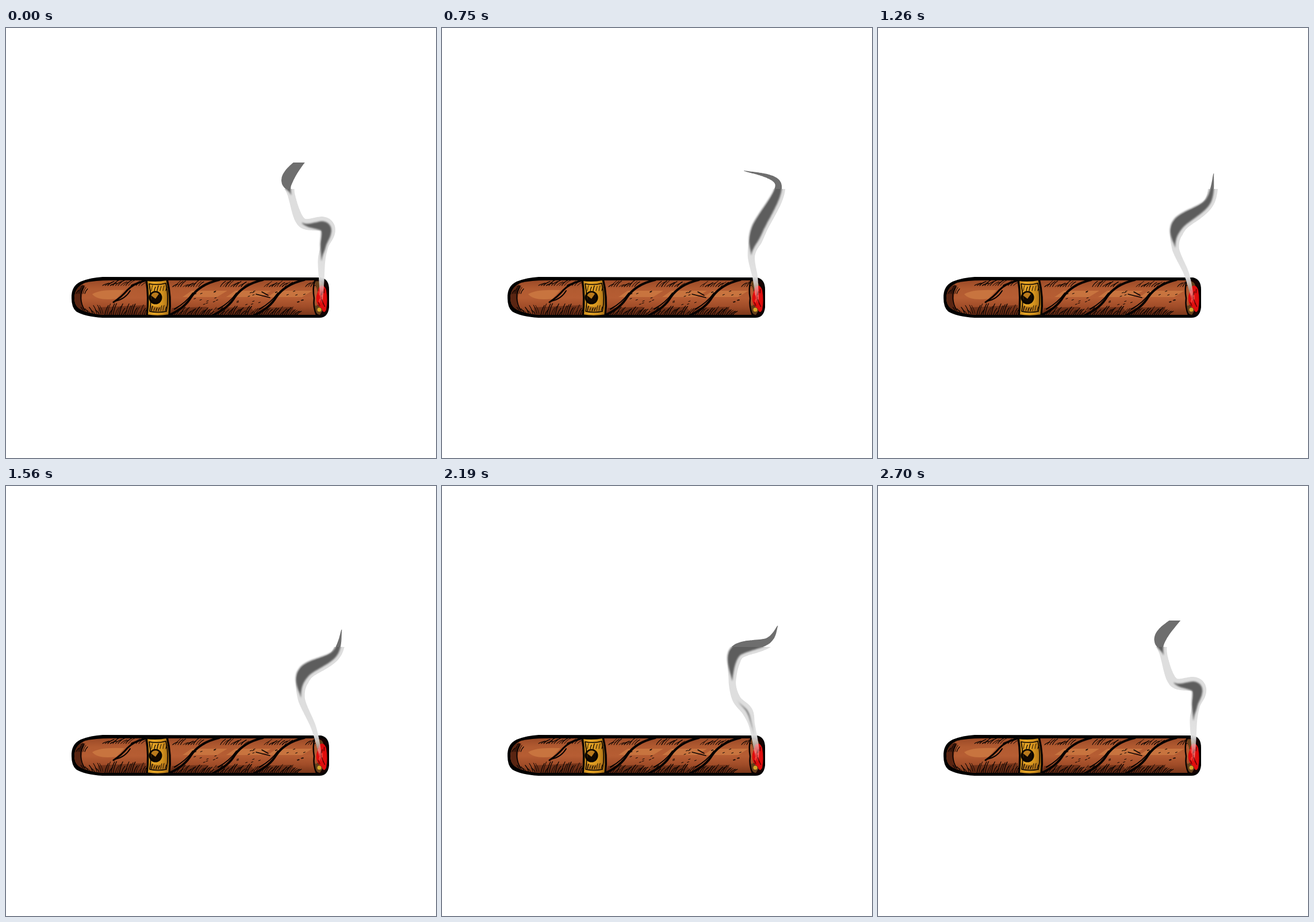
An HTML page with a canvas for the animation above (2.73 s loop, 748 by 748 pixels).

```html
<!DOCTYPE html>
<html lang="en">
<head>
<meta charset="utf-8">
<title>Cigar</title>
<style>
html, body { margin: 0; width: 100%; height: 100%; overflow: hidden; background: #fff; }
canvas { display: block; width: 748px; height: 748px; }
</style>
</head>
<body>
<canvas id="stage" width="748" height="748"></canvas>
<script>
const SIZE = 748, LOOP = 2730;
const PALE_TOP = 280, DARK_TOP = 234;
const BIRTH = -840, SHAPED = -330, DEATH = LOOP + 470;
const BASE = { x: 549, y: 479, dark: 0, pale: 4 };

const ctx = document.getElementById('stage').getContext('2d');
const art = document.createElement('canvas');
art.width = art.height = SIZE;
const pen = art.getContext('2d');

let seed = 11;
const random = () => (seed = seed * 16807 % 2147483647) / 2147483647;
const mix = (a, b, k) => a + (b - a) * k;
const ramp = (a, b, v) => Math.min(1, Math.max(0, (v - a) / (b - a)));

// A puff is a bent strand of four points, tail to tip, at a few ages.
const puffPoses = [
  { age: SHAPED, at: [[547, 434], [543, 408], [536, 390], [511, 373]] },
  { age: 390, at: [[551, 368], [562, 343], [577, 296], [519, 298]] },
  { age: 750, at: [[538, 394], [548, 351], [585, 272], [525, 248]] },
  { age: 1260, at: [[517, 381], [522, 341], [573, 303], [584, 253]] },
  { age: 2400, at: [[502, 328], [508, 276], [565, 262], [584, 241]] },
  { age: LOOP, at: [[496, 290], [490, 262], [520, 225], [560, 190]] },
  { age: DEATH, at: [[486, 205], [478, 180], [508, 140], [545, 105]] }
];

function puffShape(age) {
  const next = Math.max(1, puffPoses.findIndex(p => p.age > age));
  const a = puffPoses[next - 1], b = puffPoses[next];
  const k = ramp(a.age, b.age, age), mature = ramp(390, 750, age);
  const dark = [1, 10 + 11 * mature, 18 - 7 * mature, 1];
  const rim = [12, 4, 7, 16];
  return a.at.map(([x, y], i) => ({
    x: mix(x, b.at[i][0], k), y: mix(y, b.at[i][1], k),
    dark: dark[i], pale: dark[i] + rim[i]
  }));
}

// A young puff bulges out of the straight stem below the older one.
function growFromStem(puff, top, age) {
  const k = ramp(BIRTH, SHAPED, age);
  puff.forEach((p, i) => {
    const along = (i + 1) / 5;
    p.x = mix(mix(BASE.x, top.x, along), p.x, k);
    p.y = mix(mix(BASE.y, top.y, along), p.y, k);
    p.dark *= k ** 4;
    p.pale = mix(mix(BASE.pale, top.pale, along), p.pale, k);
  });
}

function spline(a, b, c, d, u) {
  return (2 * b + (c - a) * u + (2 * a - 5 * b + 4 * c - d) * u * u
    + (3 * b - a - 3 * c + d) * u * u * u) / 2;
}

function samplePath(points) {
  const samples = [], last = points.length - 1, steps = 40;
  for (let i = 0; i < last * steps; i++) {
    const n = Math.floor(i / steps), u = i % steps / steps;
    const near = [n - 1, n, n + 1, n + 2].map(j => points[Math.min(last, Math.max(0, j))]);
    const at = key => spline(...near.map(p => p[key]), u);
    samples.push({ x: at('x'), y: at('y'), dark: at('dark'), pale: at('pale'), n });
  }
  return samples;
}

function brush(samples, key) {
  const path = new Path2D();
  for (const s of samples) {
    const r = Math.max(0, s[key] / 2);
    path.moveTo(s.x + r, s.y);
    path.arc(s.x, s.y, r, 0, 7);
  }
  return path;
}

// The pale layer lies a little to the right of the dark strand.
function shiftRight(samples) {
  return samples.map((s, i) => {
    const a = samples[Math.max(0, i - 1)], b = samples[Math.min(samples.length - 1, i + 1)];
    const dx = b.x - a.x, dy = b.y - a.y, length = Math.hypot(dx, dy) || 1;
    const shift = Math.min(4, Math.max(0, s.dark) * 0.25);
    return { ...s, x: s.x - dy / length * shift, y: s.y + dx / length * shift };
  });
}

function fillBetween(path, top, bottom, style, blur = 0) {
  ctx.save();
  ctx.beginPath();
  ctx.rect(0, top, SIZE, bottom - top);
  ctx.clip();
  if (blur) ctx.filter = `blur(${blur}px)`;
  ctx.fillStyle = style;
  ctx.fill(path);
  ctx.restore();
}

const fade = ctx.createLinearGradient(0, 400, 0, 480);
fade.addColorStop(0, '#dedede');
fade.addColorStop(0.45, 'rgba(226,226,226,.95)');
fade.addColorStop(1, 'rgba(235,225,225,0)');

function drawSmoke(t) {
  const ages = [t - LOOP, t, t + LOOP].filter(age => age > BIRTH && age < DEATH);
  const puffs = ages.map(puffShape);
  if (ages[0] < SHAPED) growFromStem(puffs[0], puffs[1][0], ages[0]);

  const foot = puffs[0][0];
  const bend = { x: mix(BASE.x, foot.x, 0.36), y: mix(BASE.y, foot.y, 0.5), dark: 0, pale: 9 };
  const samples = samplePath([BASE, bend, ...puffs.flat()]);
  fillBetween(brush(shiftRight(samples), 'pale'), PALE_TOP, SIZE, fade);

  puffs.forEach((puff, i) => {
    const first = 2 + 4 * i;
    const strand = brush(samples.filter(s => s.n >= first && s.n < first + 3), 'dark');
    fillBetween(strand, DARK_TOP, PALE_TOP, 'rgba(0,0,0,.57)');
    fillBetween(strand, PALE_TOP, SIZE, 'rgba(0,0,0,.58)', 1.8);
  });
}

function fill(d, color) {
  pen.fillStyle = color;
  pen.fill(new Path2D(d));
}

function line(d, width, color = '#080302') {
  pen.strokeStyle = color;
  pen.lineWidth = width;
  pen.stroke(new Path2D(d));
}

function disc(x, y, r, color) {
  pen.beginPath();
  pen.arc(x, y, r, 0, 7);
  pen.fillStyle = color;
  pen.fill();
}

function gradient(x, y, ...colors) {
  const g = pen.createLinearGradient(...x, ...y);
  colors.forEach((c, i) => g.addColorStop(i / (colors.length - 1), c));
  return g;
}

function hatch(x0, x1, y, height, slant, step = 3.6) {
  for (let x = x0; x < x1; x += step) {
    const h = height * (0.4 + random() * 0.7);
    line(`M${x} ${y} q${slant * 0.3} ${-h * 0.6} ${slant} ${-h}`, 0.8 + random() * 0.6);
  }
}

function drawLeaf(x) {
  fill(`M${x + 38} 457 h62 l-18 11 h-60Z`, '#c8743f');
  fill(`M${x + 4} 487 l60 -2 l12 16 h-76Z`, 'rgba(65,24,9,.45)');
  hatch(x + 8, x + 76, 499, 14, 8);
  hatch(x + 88, x + 130, 450, 10, 9, 4.5);
  for (let i = 0; i < 12; i++)
    line(`M${x + 35 + random() * 50} ${458 + random() * 24} l3 -1`, 1);
  line(`M${x} 499 Q${x + 26} 487 ${x + 37} 468 Q${x + 52} 446 ${x + 86} 438`, 4);
  line(`M${x + 8} 489 Q${x + 28} 478 ${x + 40} 461`, 2);
}

function drawBody() {
  fill('M114 470 Q113 449 130 441 Q148 434 168 433 L548 434 Q562 437 562 455 V486 Q560 504 545 504 L168 504 Q136 502 122 493 Q114 486 114 470Z', '#000');
  pen.save();
  pen.clip(new Path2D('M119 470 Q119 451 138 443 Q156 439 180 439 H540 L544 470 L540 499 H168 Q138 496 126 487 Q119 481 119 470Z'));
  pen.fillStyle = gradient([0, 439], [0, 500], '#9b4a27', '#b25b31', '#b65d33', '#a04c28', '#783519');
  pen.fillRect(114, 432, 450, 74);
  fill('M150 463 Q162 454 206 456 L192 471 Q160 475 150 463Z', '#c8743f');
  fill('M117 448 H138 Q126 468 137 493 H117Z', '#5a2512');
  fill('M160 486 L243 482 V499 H160Z', 'rgba(65,24,9,.45)');
  hatch(122, 138, 462, 15, 5, 3);
  hatch(122, 172, 497, 14, -6);
  hatch(172, 243, 499, 18, 6);
  hatch(168, 236, 448, 9, 11, 4.5);
  hatch(290, 345, 450, 10, 9, 4.5);
  line('M187 477 Q202 467 211 456 Q221 445 244 439', 3);
  line('M190 475 Q207 472 216 457', 2);
  line('M135 448 Q124 469 137 491', 1.5);
  for (const x of [285, 361, 433]) drawLeaf(x);
  line('M435 463 L459 469 M445 459 L456 465', 1.5);
  pen.restore();
}

function drawBand() {
  const edge = 'M244 438 Q262 441 280 437 Q288 468 284 500 Q263 503 245 500 Q249 469 244 438Z';
  fill(edge, gradient([243, 0], [286, 0], '#c6861b', '#e5a526', '#d3921e', '#9d6513'));
  fill('M250 482 Q265 489 281 480 V494 H250Z', '#b4761a');
  line(edge, 3.5);
  line('M249 445 Q264 448 278 444 Q284 469 279 493 Q264 496 250 493 Q254 470 249 445', 1.6);
  hatch(253, 279, 457, 9, 2, 5);
  hatch(253, 280, 492, 9, 2, 4);
  disc(260, 469, 11.5, '#080401');
  disc(260, 468, 8, '#ba7b1c');
  fill('M252 465 L260 471 L267 461 Q271 478 260 478 Q252 476 252 465Z', '#120901');
}

function drawEmber() {
  fill('M537 439 Q550 436 558 443 Q562 470 559 493 Q552 503 540 499 Q548 470 537 439Z', '#160302');
  fill('M537 441 Q549 438 552 448 L543 462Z M537 483 Q546 481 551 491 L546 499 Q537 498 537 483Z', '#65401b');
  fill('M545 450 Q553 444 557 456 Q560 474 557 490 Q553 499 549 488 Q538 481 540 466Z', '#e00d0d');
  disc(545, 490, 3.5, '#d5a62a');
  for (let i = 0; i < 9; i++) {
    const x = 543 + random() * 11, y = 454 + random() * 32;
    line(`M${x} ${y} l${random() * 6 - 3} 6`, 1.6, i % 3 ? '#690505' : '#ff4035');
  }
  line('M537 440 Q533 453 536 470 Q534 486 540 499', 2.5);
}

const start = performance.now();

function tick() {
  ctx.fillStyle = '#fff';
  ctx.fillRect(0, 0, SIZE, SIZE);
  ctx.drawImage(art, 0, 0);
  drawSmoke((performance.now() - start) % LOOP);
  requestAnimationFrame(tick);
}

pen.lineCap = pen.lineJoin = 'round';
drawBody();
drawBand();
drawEmber();
tick();
</script>
</body>
</html>
```
